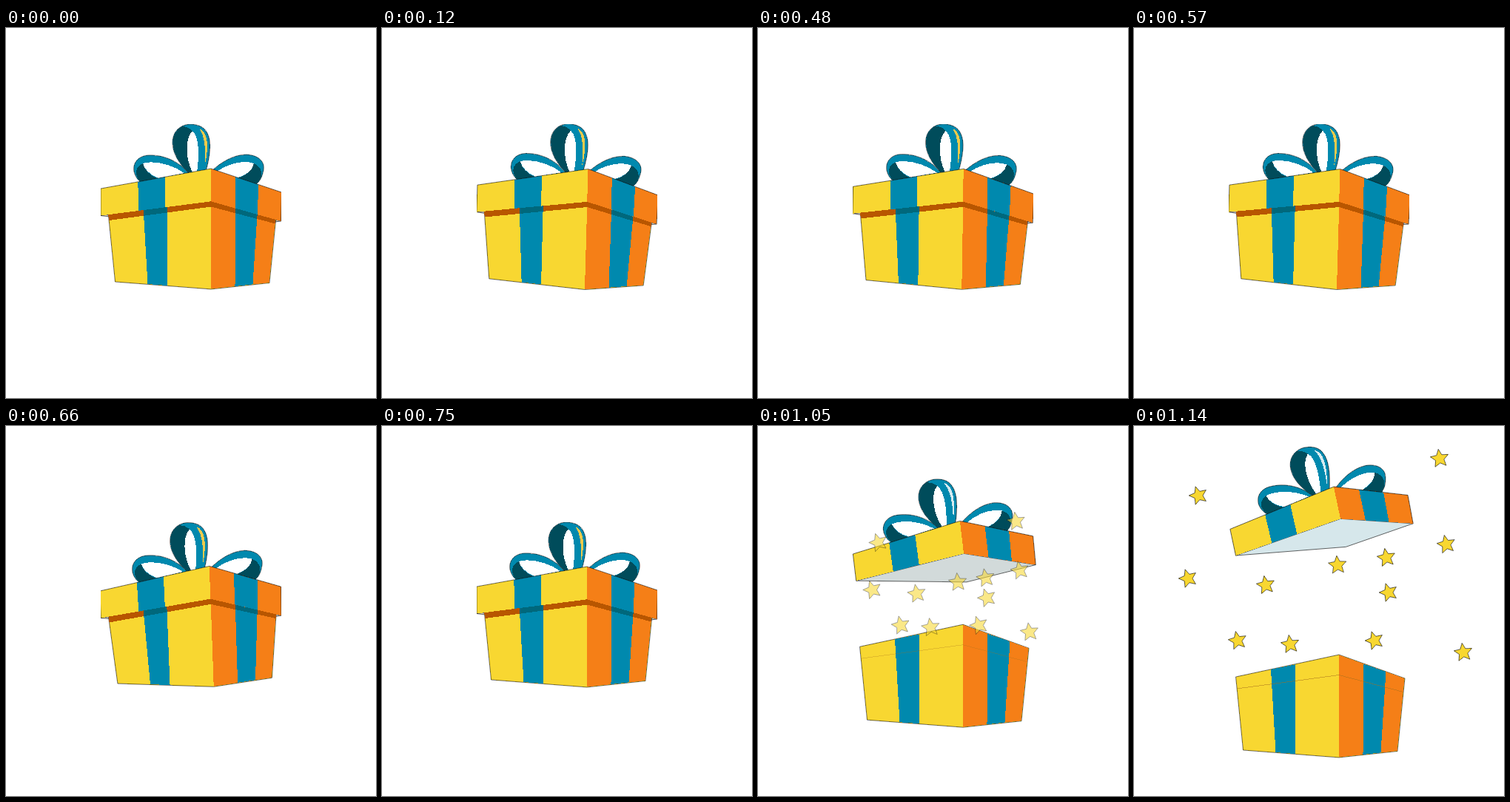
Animation of 500x500 px, one loop 2.13 s. Source, as an HTML page:

```html
<!DOCTYPE html>
<html lang="en">
<head>
<meta charset="utf-8">
<title>Gift box</title>
<style>
  html, body { margin: 0; width: 100%; height: 100%; overflow: hidden; background: #fff; }
  svg { display: block; width: 100%; height: 100%; shape-rendering: crispEdges; }
  .yellow { fill: #f8d731; }
  .orange { fill: #f57f17; }
  .blue { fill: #0089ae; }
  .dark { fill: #004c5b; }
  .hole { fill: #fff; }
  .shade { fill: #b85600; }
  .shade-blue { fill: #00687c; }
  .edge { stroke: #111; stroke-width: .6; stroke-linejoin: round; }
  .line { fill: none; }
</style>
</head>
<body>
<svg viewBox="0 0 500 500" xmlns="http://www.w3.org/2000/svg">
  <defs>
    <clipPath id="frame"><rect x="128" y="130" width="244" height="226"/></clipPath>
    <path id="star"/>
  </defs>

  <g id="clip">
    <g id="gift">
      <path id="under" class="edge" d="M128 253.500 277 234.300 371.500 261 276 273Z"/>

      <g id="body">
        <path class="yellow edge" d="M137.500 244 277 214 366 246 356 344.500 277 353 147.500 343Z"/>
        <path class="orange" d="M277 214.500 365.500 246 355.500 344 277 352.500Z"/>
        <path class="blue" d="M185 234 217.500 227.300 218 348 191.500 346Z"/>
        <path class="blue" d="M310 226.500 340.500 237 333.500 346.300 309.500 349Z"/>
        <path id="seam" class="line" stroke="#a8701c" stroke-width=".5" d="M139 260 277 241.500 364 264.500"/>
        <g id="shadow">
          <path class="shade" d="M137.500 244 277 214.500 365.500 246 364 264.500 277 241.500 139 260Z"/>
          <path class="shade-blue" d="M185 234 217.500 227.300 217.600 249.500 186.200 253.700Z"/>
          <path class="shade-blue" d="M310 226.500 340.500 237 339.300 258 310 250.200Z"/>
        </g>
      </g>

      <g id="lid">
        <path class="blue edge" d="M247 196C232 179 212 171 192 172C178 173 171 183 173 194C175 202 179 206 182 208Z"/>
        <path class="dark" d="M185 183C175 187 172 198 182 208L206 204C194 199 187 192 185 183Z"/>
        <path class="hole" d="M185 183C200 178 226 185 241 196L206 203C194 198 187 191 185 183Z"/>

        <path class="blue edge" d="M278 193C291 181 308 171 325 171C342 172 350 181 348 192C346 202 343 207 339 210Z"/>
        <path class="dark" d="M335 183C345 187 350 199 339 211L313 203C325 199 333 193 335 183Z"/>
        <path class="hole" d="M285 194C299 184 320 177.500 335 183C333 193 325 198 313 202.500Z"/>

        <path class="blue edge" d="M270 194C276 172 278 153 272 142C268 133 258 130 248 130C234 131 225 141 225 155C225 169 234 184 247 196Z"/>
        <path class="dark" d="M238 133C230 137 225.500 145 225.500 155C225.500 169 234 184 247 196L252 194C246 178 240 155 252 139C248 135 243 133 238 133Z"/>
        <path class="hole" d="M252 139C246.500 145 244.500 153 244.500 163C244.500 175 247 185 252 195L258 195C260.500 176 262.500 149 252 139Z"/>
        <path id="shine" d="M261.500 136C273 141 274.500 160 268.500 186C270 163 269 147 261.500 136Z"/>

        <path class="yellow" d="M128 217 277 190 277 234.300 128 253.500Z"/>
        <path class="orange" d="M276.800 190 372.500 222 371.500 261 276.800 234.300Z"/>
        <path class="blue" d="M178.300 207.900 214.500 201.300 215 242.300 179.300 246.900Z"/>
        <path class="blue" d="M309.500 201 341 211.500 340 252.100 309.500 243.500Z"/>
        <path class="line edge" d="M128 253.500 128 217 277 190 372.500 222 371.500 261"/>
      </g>
    </g>
  </g>
  <g id="stars"></g>
</svg>

<script>
  const LOOP = 2130, STEP = 30;
  const OPEN = { from: 960, to: 1140 };
  const CENTER = [263, 242];
  // x, y and tilt of each star at rest
  const STARS = [
    [87, 94, -18], [413, 44, -8], [73, 206, -18], [178, 215, -10],
    [275, 188, -5], [341, 178, -10], [422, 160, -12], [344, 225, -18],
    [140, 290, -12], [211, 295, -8], [325, 290, -18], [445, 306, -8]
  ];

  const $ = id => document.getElementById(id);
  const set = (el, name, value) => el.setAttribute(name, value);

  const points = Array.from({ length: 10 }, (_, i) => {
    const r = i % 2 ? 6 : 12.800, a = Math.PI * (i / 5 - .5);
    return (r * Math.cos(a)).toFixed(2) + ' ' + (r * Math.sin(a)).toFixed(2);
  });
  set($('star'), 'd', 'M' + points.join('L') + 'Z');

  const stars = STARS.map(() => {
    const use = document.createElementNS('http://www.w3.org/2000/svg', 'use');
    set(use, 'href', '#star');
    set(use, 'class', 'yellow edge');
    return $('stars').appendChild(use);
  });

  // One shake: out, across and back in 300 ms
  function shake(ms) {
    if (ms <= 0 || ms >= 300) return 0;
    const u = ms / 100, peak = .045;
    if (u < 1) return peak * Math.sin(u * Math.PI / 2);
    if (u < 2) return peak * Math.cos((u - 1) * Math.PI);
    return -peak * Math.cos((u - 2) * Math.PI / 2);
  }

  function opening(t) {
    const u = (t - OPEN.from) / (OPEN.to - OPEN.from);
    return 1 - (1 - Math.min(1, Math.max(0, u))) ** 1.220;
  }

  function draw(t) {
    const s = shake(t) + shake(t - 450);
    const p = opening(t);

    set($('gift'), 'transform', `matrix(1 ${s} ${-.8 * s} 1 ${.8 * s * 248} ${-s * 262})`);
    set($('clip'), 'clip-path', p ? 'none' : 'url(#frame)');

    set($('body'), 'transform', `translate(0 ${95 * p})`);
    set($('shadow'), 'opacity', Math.max(0, 1 - 2.500 * p));
    set($('seam'), 'opacity', p);

    const lift = `translate(${-7 * p} ${-108 * p}) rotate(${-12 * p} 277 190)`;
    set($('lid'), 'transform', lift);
    set($('under'), 'transform', lift);
    set($('under'), 'fill', `rgb(${204 + 10 * p}, ${201 + 30 * p}, ${196 + 39 * p})`);
    set($('shine'), 'fill', p ? '#d6eaef' : '#ecca4c');

    set($('stars'), 'visibility', p ? 'visible' : 'hidden');
    stars.forEach((star, i) => {
      const [x, y, tilt] = STARS[i];
      const sx = CENTER[0] + (x - CENTER[0]) * p;
      const sy = CENTER[1] + (y - CENTER[1]) * p;
      set(star, 'transform', `translate(${sx} ${sy}) rotate(${tilt})`);
      set(star, 'opacity', p);
    });
  }

  const start = performance.now();
  function tick() {
    const t = (performance.now() - start) % LOOP;
    draw(Math.floor(t / STEP) * STEP);
    requestAnimationFrame(tick);
  }
  tick();
</script>
</body>
</html>
```
